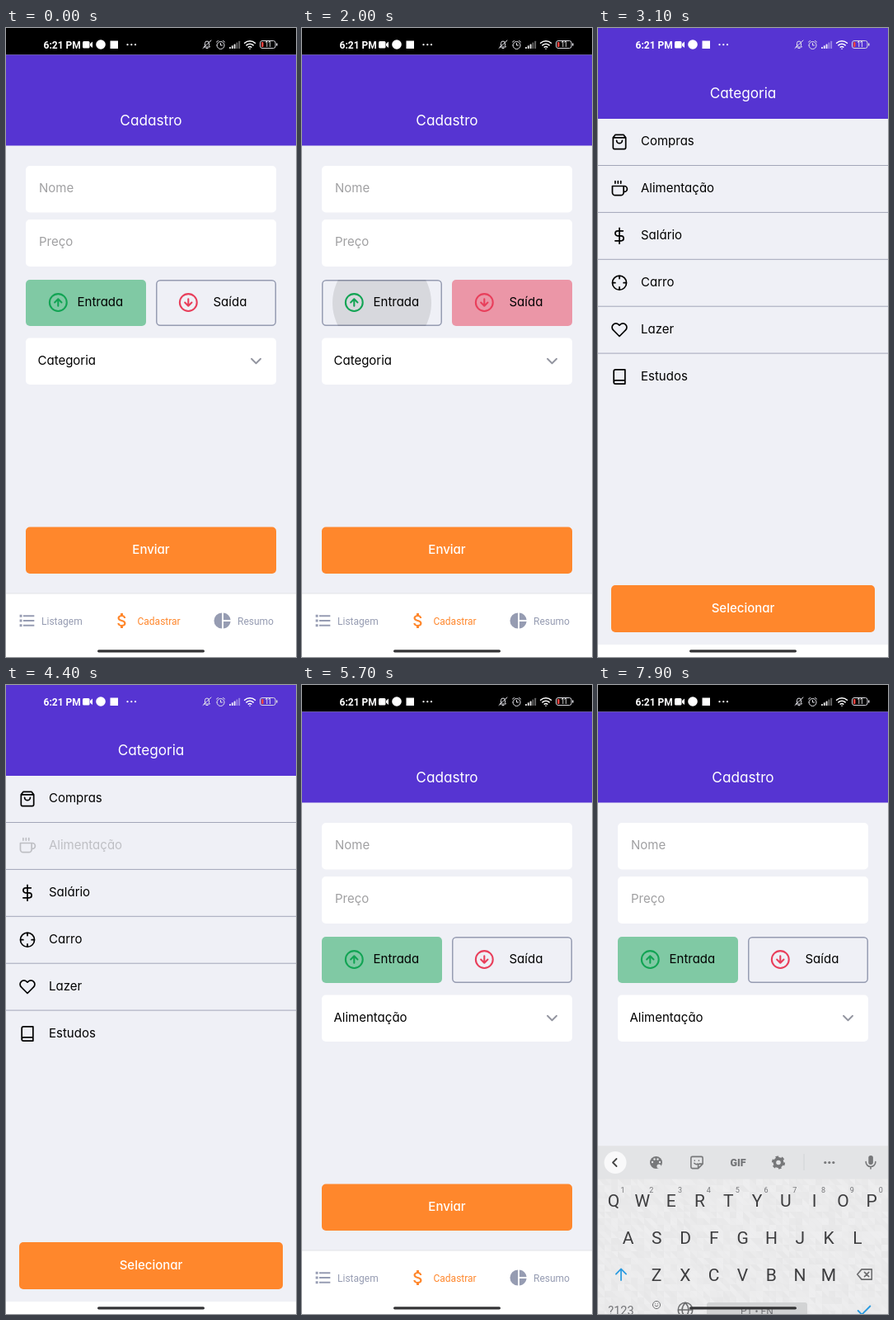
An HTML page that plays this animation: 352 px wide and 762 px high, repeating every 8000 ms.

```html
<!DOCTYPE html>
<html lang="pt">
<head>
<meta charset="utf-8">
<title>Cadastro</title>
<style>
html, body { margin: 0; width: 100%; height: 100%; overflow: hidden; background: #fff; }
svg { display: block; width: 100vw; height: 100vh; }
text { font-family: Inter, sans-serif; font-feature-settings: "cv11"; font-size: 15px; }
.mid { text-anchor: middle; }
.title { font-size: 17.2px; fill: #fff; }
.hint { fill: #a0a0a2; }
.button { font-weight: 500; fill: #fff; }
.tab, .key, .clock { font-family: Roboto, sans-serif; }
.tab { font-size: 12px; }
.clock { font-size: 12px; font-weight: 700; fill: #fff; }
.key { font-size: 21px; fill: #3d3d3f; text-anchor: middle; }
.line { fill: none; stroke: currentColor; stroke-width: 2; stroke-linecap: round; stroke-linejoin: round; }
</style>
</head>
<body>
<svg id="stage" viewBox="0 0 352 762"></svg>
<script>
const LOOP = 8000, STEP = 100;
const C = {
  purple: '#5634d2', orange: '#ff872c', back: '#eff0f6', gray: '#969cb2',
  green: '#12a454', red: '#e83f5b', tool: '#77787a', blue: '#2a9be0'
};

const text = (x, y, str, cls = '', extra = '') => `<text x="${x}" y="${y}" class="${cls}" ${extra}>${str}</text>`;
const rect = (x, y, w, h, fill, r = 0, extra = '') =>
  `<rect x="${x}" y="${y}" width="${w}" height="${h}" rx="${r}" fill="${fill}" ${extra}/>`;
const dot = (x, y, r, fill, extra = '') => `<circle cx="${x}" cy="${y}" r="${r}" fill="${fill}" ${extra}/>`;
// Icons live on a 24-unit grid and are placed by their centre.
const place = (x, y, size, body) =>
  `<g transform="translate(${x - size / 2} ${y - size / 2}) scale(${size / 24})">${body}</g>`;
const line = (x, y, size, d, color = '#000', width = 2) =>
  place(x, y, size, `<path class="line" d="${d}" style="color:${color};stroke-width:${width}"/>`);
const solid = (x, y, size, d, color) => place(x, y, size, `<path d="${d}" fill="${color}" fill-rule="evenodd"/>`);

const RING = 'M2 12a10 10 0 0 1 20 0a10 10 0 0 1-20 0';
const DOLLAR = 'M12 1v22M17 5H9.5a3.5 3.5 0 0 0 0 7h5a3.5 3.5 0 0 1 0 7H6';
const ICON = {
  up: RING + 'M16 12l-4-4-4 4M12 16V8',
  down: RING + 'M8 12l4 4 4-4M12 8v8',
  chevron: 'M6 9l6 6 6-6',
  bag: 'M6 2 3 6v14a2 2 0 0 0 2 2h14a2 2 0 0 0 2-2V6l-3-4zM3 6h18M16 10a4 4 0 0 1-8 0',
  coffee: 'M18 8h1a4 4 0 0 1 0 8h-1M2 8h16v9a4 4 0 0 1-4 4H6a4 4 0 0 1-4-4zM6 1v3M10 1v3M14 1v3',
  cross: RING + 'M22 12h-4M6 12H2M12 6V2M12 22v-4',
  heart: 'M20.84 4.61a5.5 5.5 0 0 0-7.78 0L12 5.67l-1.06-1.06a5.5 5.5 0 0 0-7.78 7.78L12 21.23l8.84-8.84a5.5 5.5 0 0 0 0-7.78z',
  book: 'M4 19.5A2.5 2.5 0 0 1 6.5 17H20M6.5 2H20v20H6.5A2.5 2.5 0 0 1 4 19.5v-15A2.5 2.5 0 0 1 6.5 2z',
  list: 'M2.5 4.5h3v3h-3zM2.5 10.5h3v3h-3zM2.5 16.5h3v3h-3zM7 5h14v2H7zM7 11h14v2H7zM7 17h14v2H7z',
  money: 'M11.8 10.9c-2.27-.59-3-1.2-3-2.15 0-1.09 1.01-1.85 2.7-1.85 1.78 0 2.44.85 2.5 2.1h2.21c-.07-1.72-1.12-3.3-3.21-3.81V3h-3v2.16c-1.94.42-3.5 1.68-3.5 3.61 0 2.31 1.91 3.46 4.7 4.13 2.5.6 3 1.48 3 2.41 0 .69-.49 1.79-2.7 1.79-2.06 0-2.87-.92-2.98-2.1h-2.2c.12 2.19 1.76 3.42 3.68 3.83V21h3v-2.15c1.95-.37 3.5-1.5 3.5-3.55 0-2.84-2.43-3.81-4.7-4.4z',
  pie: 'M11 2v20a10 10 0 0 1 0-20zM13 2v9h9a10 10 0 0 0-9-9zM13 13v9a10 10 0 0 0 9-9z'
};

function toggle(id, x, label, labelX, icon, color) {
  return `<clipPath id="${id}Clip">${rect(x, 305, 146, 56, '#000', 5)}</clipPath>
    ${rect(x + .75, 305.75, 144.5, 54.5, 'none', 4.5, `id="${id}Edge" stroke="${C.gray}" stroke-width="1.5"`)}
    ${rect(x, 305, 146, 56, color, 5, `id="${id}Fill" opacity=".5"`)}
    <g clip-path="url(#${id}Clip)">${dot(x + 73, 333, 0, '#000', `id="${id}Ripple"`)}</g>
    ${line(x + 39.3, 332.5, 25, icon, color)}
    ${text(labelX, 337, label)}`;
}

function form() {
  return rect(0, 0, 352, 762, C.back) + rect(0, 0, 352, 32.5, '#000') + rect(0, 32.5, 352, 110, C.purple)
    + text(176, 118, 'Cadastro', 'title mid')
    + rect(24, 167, 304, 56.5, '#fff', 5) + text(40, 199, 'Nome', 'hint')
    + rect(40, 182.5, 2, 25, '#12bfa8', 0, 'id="cursor"')
    + rect(24, 232, 304, 57, '#fff', 5) + text(40, 264, 'Preço', 'hint')
    + toggle('income', 24, 'Entrada', 86.5, ICON.up, C.green)
    + toggle('outcome', 182, 'Saída', 251.5, ICON.down, C.red)
    + `<g id="picker">${rect(24, 375.5, 304, 56.5, '#fff', 5)}
       ${text(38.5, 407.5, '', '', 'id="choice"')}${line(303.5, 403.5, 22, ICON.chevron, '#92949f')}</g>`
    + rect(24, 604.5, 304, 56.5, C.orange, 5) + text(176, 637, 'Enviar', 'button mid')
    + rect(0, 685, 352, 77, '#fff') + rect(0, 684.5, 352, 1, '#e2e3e8')
    + solid(25.7, 718, 23, ICON.list, C.gray) + text(43, 723, 'Listagem', 'tab', `fill="${C.gray}"`)
    + solid(141, 718, 24, ICON.money, C.orange) + text(159.5, 723, 'Cadastrar', 'tab', `fill="${C.orange}"`)
    + solid(263, 718, 23, ICON.pie, C.gray) + text(281, 723, 'Resumo', 'tab', `fill="${C.gray}"`);
}

function modal() {
  const rows = [['Compras', ICON.bag], ['Alimentação', ICON.coffee], ['Salário', DOLLAR],
    ['Carro', ICON.cross], ['Lazer', ICON.heart], ['Estudos', ICON.book]];
  const list = rows.map(([name, icon], i) => {
    const y = 110 + i * 56.9;
    const row = line(26, y + 28, 20.5, icon) + text(52, y + 32.3, name);
    return (i === 1 ? `<g id="food">${rect(0, y, 352, 57, C.orange, 0, 'id="foodFill" opacity=".33"')}${row}</g>` : row)
      + (i < 5 ? rect(0, y + 56, 352, 1, '#a2a6b8') : '');
  }).join('');
  return `<clipPath id="screen">${rect(0, 0, 352, 747, '#000')}</clipPath>
    <g id="modal"><g clip-path="url(#screen)"><g id="sheet">
    ${rect(0, 0, 352, 747, C.back)}${rect(0, 0, 352, 110, C.purple)}
    ${text(176, 85, 'Categoria', 'title mid')}${list}
    <g id="select">${rect(16, 675, 320, 57, C.orange, 5)}${text(176, 707.5, 'Selecionar', 'button mid')}</g>
    </g></g>${rect(0, 747, 352, 15, '#fff')}</g>`;
}

function status() {
  const bars = [0, 1, 2, 3, 4].map(i =>
    rect(271 + i * 2.8, 23 - i * 1.8, 1.9, 2 + i * 1.8, '#fff', .5, `opacity="${i < 3 ? .9 : .4}"`)).join('');
  return text(45.5, 24.5, '6:21 PM', 'clock')
    + rect(93, 16, 8.5, 8.5, '#fff', 1.5) + '<path d="M102 19l3-2.5v7.500l-3-2.500z" fill="#fff"/>'
    + dot(115, 20, 5.8, '#fff') + rect(126.5, 15.5, 9.5, 9.5, '#fff')
    + [147.5, 152.3, 157].map(x => dot(x, 20.2, 1.1, '#fff')).join('')
    + line(244, 20, 12, 'M5 18h14l-2-3V9a5 5 0 0 0-10 0v6zM10 21h4M2 21L22 2', '#e4e4ea')
    + line(260.5, 20.5, 12, 'M3 13a9 9 0 0 1 18 0a9 9 0 0 1-18 0M12 8v5h4M2 5l4-3M22 5l-4-3', '#e4e4ea')
    + bars
    + line(296, 20, 14, 'M1 9a16 16 0 0 1 22 0M5 13.500a10 10 0 0 1 14 0M9 17.500a5 5 0 0 1 6 0M12 21h.1', '#fff', 2.6)
    + rect(308.5, 15.5, 18.5, 9, 'none', 2.5, 'stroke="#d8d8de"') + rect(328, 18.5, 1.5, 3, '#d8d8de')
    + rect(310, 17, 2.5, 6, '#f0433f', .8)
    + text(318, 23.3, '11', 'mid', 'style="font-size:8.5px;fill:#fff"');
}

// Faint low-poly texture behind the keys.
function texture() {
  let seed = 7, out = '';
  const shade = () => {
    seed = seed * 16807 % 2147483647;
    const v = 231 + seed % 8;
    return `rgb(${v},${v},${v + 1})`;
  };
  for (let y = 598; y < 762; y += 8)
    for (let x = 0; x < 352; x += 8)
      out += `<path d="M${x} ${y}h8v8z" fill="${shade()}"/><path d="M${x} ${y}v8h8z" fill="${shade()}"/>`;
  return out;
}

function keyboard() {
  const row = (letters, x, y) => [...letters].map((c, i) => text(x + i * 34.8, y, c, 'key')).join('');
  const small = (x, y, str, size, extra = '') =>
    text(x, y, str, 'key', `style="font-size:${size}px;fill:#747578;${extra}"`);
  const digits = [...'1234567890'].map((c, i) => small(30 + i * 34.8, 615, c, 9)).join('');
  const gear = dot(219, 578.5, 4.6, 'none', `stroke="${C.tool}" stroke-width="3.6"`)
    + dot(219, 578.5, 6.8, 'none', `stroke="${C.tool}" stroke-width="2.600" stroke-dasharray="3.56"`);
  const palette = dot(70.5, 578.5, 7.5, C.tool)
    + [[66, 578], [68.5, 574.5], [72.5, 574.5], [75, 578]].map(([x, y]) => dot(x, y, 1.2, '#e4e5e7')).join('')
    + dot(74, 583, 2.6, '#e4e5e7');
  return rect(0, 558.5, 352, 204, '#e8e8e9') + texture() + rect(0, 558.5, 352, 40, '#e3e4e6')
    + dot(21, 578.5, 13.5, '#f9f9fa') + line(21, 578.5, 18, 'M14 6l-6 6 6 6', '#444', 2.4)
    + palette
    + line(120, 578.5, 19, 'M5 3h14a2 2 0 0 1 2 2v9l-7 7H5a2 2 0 0 1-2-2V5a2 2 0 0 1 2-2zM14 21v-5a2 2 0 0 1 2-2h5M8.500 9h.1M15 9h.1M8 13q3 3 5 1', C.tool)
    + small(170, 583, 'GIF', 12.5, 'font-weight:900')
    + gear + rect(249.5, 568, 1, 20, '#d2d3d5')
    + [275.8, 280.8, 285.8].map(x => dot(x, 578.5, 1.6, C.tool)).join('')
    + rect(328.3, 570, 5.6, 11, C.tool, 2.8)
    + line(331, 578.5, 20, 'M5 11a7 7 0 0 0 14 0M12 18v3', C.tool)
    + row('QWERTYUIOP', 19, 631.5) + digits + row('ASDFGHJKL', 36.5, 677) + row('ZXCVBNM', 71, 721.5)
    + line(28, 714, 21, 'M12 20V5M5 11.500l7-7 7 7', C.blue)
    + line(323.5, 714, 21, 'M8 5h14v14H8l-6-7zM12 9l6 6M18 9l-6 6', '#6b6c6e', 1.8)
    + small(28, 763, '?123', 14.5)
    + line(71, 751, 11, RING + 'M8 14q4 4 8 0M9 9h.1M15 9h.1', '#6b6c6e')
    + line(106, 757, 21, RING + 'M2 12h20M12 2q-9 10 0 20M12 2q9 10 0 20', '#6b6c6e', 1.7)
    + rect(132, 748, 122, 20, '#d2d3d4', 3) + small(193, 763, 'PT • EN', 12)
    + line(323, 758, 22, 'M4 12l5 5L20 6', C.blue);
}

document.getElementById('stage').innerHTML = form() + modal() + status()
  + `<g id="keyboard">${keyboard()}</g>` + rect(111, 753.2, 130, 3.2, '#343436', 1.6);

const $ = id => document.getElementById(id);
const set = (id, name, value) => $(id).setAttribute(name, value);
const show = (id, on) => set(id, 'visibility', on ? 'visible' : 'hidden');
const within = (t, a, b) => t >= a && t < b;
const clamp = v => Math.max(0, Math.min(1, v));
const ease = p => p < .5 ? 2 * p * p : 1 - 2 * (1 - p) ** 2;

function ripple(id, t, start, end) {
  const on = within(t, start, end);
  set(id + 'Ripple', 'r', on ? 30 + 60 * clamp((t - start) / 200) : 0);
  set(id + 'Ripple', 'opacity', t >= end - STEP ? .05 : .1);
}

function select(id, on) {
  show(id + 'Fill', on);
  show(id + 'Edge', !on);
}

// Sheet offset: decelerates in, accelerates out.
function sheetY(t) {
  if (t < 3100) return 747 * (1 - clamp((t - 2880) / 200)) ** 2;
  return 747 * clamp((t - 5490) / 200) ** 2;
}

function render(t) {
  const outcome = within(t, 1200, 2200);
  select('income', !outcome);
  select('outcome', outcome);
  ripple('outcome', t, 1000, 1300);
  ripple('income', t, 1900, 2300);

  set('picker', 'opacity', within(t, 2600, 3100) ? .2 : 1);
  $('choice').textContent = t < 5400 ? 'Categoria' : 'Alimentação';

  show('modal', within(t, 3000, 5700));
  set('sheet', 'transform', `translate(0 ${sheetY(t)})`);
  set('food', 'opacity', t < 4400 ? 1 : .2 + .8 * ease(clamp((t - 4520) / 320)));
  set('foodFill', 'opacity', t >= 4600 ? .33 : 0);
  set('select', 'opacity', t >= 5400 ? .2 : 1);

  show('cursor', within(t, 7200, 7700));
  show('keyboard', t >= 7900);
}

const start = performance.now();
function tick() {
  const t = (performance.now() - start) % LOOP;
  render(Math.floor(t / STEP) * STEP);
  requestAnimationFrame(tick);
}
tick();
</script>
</body>
</html>
```
